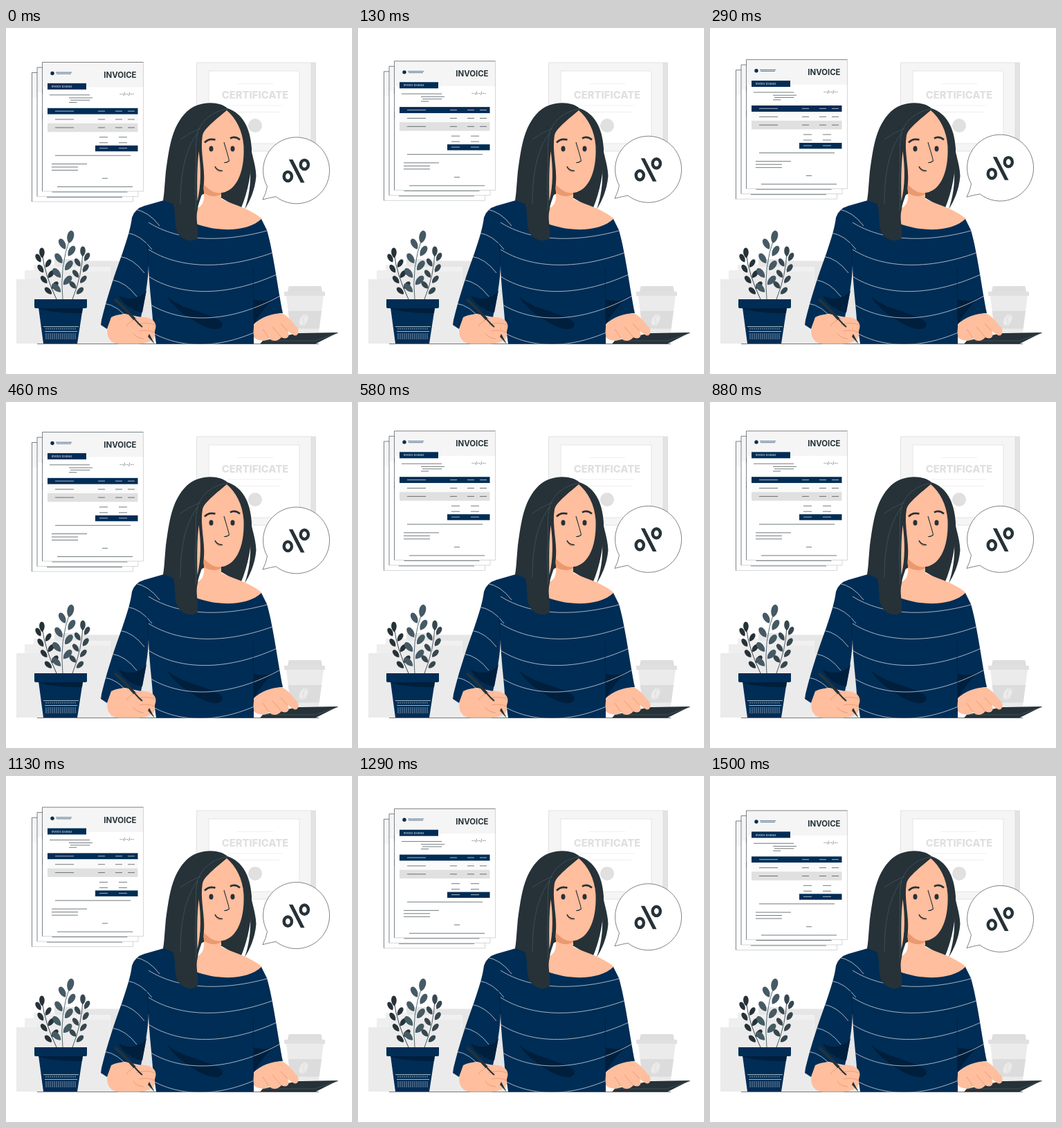
An HTML page with a canvas for the animation above (1.54 s loop, 500 px wide and 500 px high).

```html
<!DOCTYPE html>
<html lang="en">
<head>
<meta charset="utf-8">
<title>Invoice desk</title>
<style>
html, body { margin: 0; width: 100%; height: 100%; overflow: hidden; background: #fff; }
canvas { display: block; width: 500px; height: 500px; }
</style>
</head>
<body>
<canvas id="stage"></canvas>
<script>
const LOOP = 1540, FPS = 24, STEPS = 37, RISE = 10;
const NAVY = '#002d55', DEEP = '#001f3d', INK = '#263238', SLATE = '#455a64';
const SKIN = '#ffbe9d', SHADE = '#eb996e';

const canvas = document.getElementById('stage');
const ctx = canvas.getContext('2d');
const ratio = window.devicePixelRatio || 1;
canvas.width = canvas.height = 500 * ratio;

function rect(color, x, y, width, height) {
  ctx.fillStyle = color;
  ctx.fillRect(x, y, width, height);
}

function fill(color, d) {
  ctx.fillStyle = color;
  ctx.fill(new Path2D(d));
}

function stroke(color, width, d) {
  ctx.strokeStyle = color;
  ctx.lineWidth = width;
  ctx.stroke(new Path2D(d));
}

function dash(color, x, y, length) {
  stroke(color, 0.65, `M${x} ${y}h${length}`);
}

function ellipse(x, y, rx, ry = rx, angle = 0) {
  ctx.beginPath();
  ctx.ellipse(x, y, rx, ry, angle, 0, 2 * Math.PI);
}

function dot(color, ...shape) {
  ellipse(...shape);
  ctx.fillStyle = color;
  ctx.fill();
}

function label(text, x, y, font, color, align = 'left') {
  ctx.font = font + ' Inter, sans-serif';
  ctx.textAlign = align;
  ctx.fillStyle = color;
  ctx.fillText(text, x, y);
}

function certificate() {
  rect('#f5f5f5', 275.5, 50, 165.5, 128);
  rect('#e3e3e3', 441, 50, 6.5, 128);
  stroke('#dcdcdc', 0.8, 'M275.5 50h172v128h-172ZM441 50v128');
  rect('#fff', 293, 62, 131, 105);
  stroke('#e0e0e0', 0.8, 'M293 62h131v105h-131Z');
  label('CERTIFICATE', 360, 102, '800 14.8px', '#e0e0e0', 'center');
  dash('#e6e6e6', 334, 80.5, 52);
  dash('#e6e6e6', 320, 112, 80);
  dash('#e6e6e6', 325, 121.5, 70);
  dot('#e0e0e0', 360, 141, 10);
}

function folders() {
  fill('#e6e6e6', 'M70 334H101L104 336.5H214V456H70Z');
  fill('#f0f0f0', 'M40 342H70L73 345H151V456H40Z');
  fill('#efefef', 'M27 350H60L63 353H150V456H27Z');
  fill('#ebebeb', 'M15 363H46L49 352H150V456H15Z');
}

function cup() {
  fill('#ebebeb', 'M405 386H459L452 440H411Z');
  fill('#dcdcdc', 'M408 409H456L452.5 434.5H411Z');
  fill('#dedede', 'M410 373H454Q456 373 456 376L457 381H407L408 376Q408 373 410 373Z');
  rect('#e0e0e0', 402, 381, 59, 6);
  dot('#ebebeb', 430, 422, 5.5, 9, 0.5);
  stroke('#dcdcdc', 1, 'M434 414Q427 421 430 424T425 431');
}

function leaf(color, x, y, length, angle) {
  const h = length / 2, w = length * 0.4;
  ctx.save();
  ctx.translate(x, y);
  ctx.rotate(angle);
  fill(color, `M0 ${h}C${-w} ${h / 3} ${-w * 0.7} ${-h} 0 ${-h}C${w * 0.7} ${-h} ${w} ${h / 3} 0 ${h}Z`);
  ctx.restore();
}

// Leaves alternate sides down a curved stem, opening wider near its foot.
function branch(color, foot, bend, tip, length, firstSide) {
  const [a, b, c] = [foot, bend, tip];
  const at = (k, t) => (1 - t) ** 2 * a[k] + 2 * t * (1 - t) * b[k] + t * t * c[k];
  stroke(color, 0.9, `M${a}Q${b} ${c}`);
  leaf(color, ...c, length * 1.1, (c[0] - b[0]) / 70);
  for (let i = 1; i < 8; i++) {
    const t = 1 - i * 0.118, side = i % 2 ? firstSide : -firstSide;
    leaf(color, at(0, t) + side * length * 0.46, at(1, t), length, side * (0.45 + i * 0.05));
  }
}

function plant() {
  branch(INK, [73, 392], [56, 357], [52, 325], 13.5, -1);
  branch('#37474f', [96, 392], [110, 357], [111, 323], 13.5, 1);
  branch(SLATE, [82, 392], [77, 345], [93, 302], 17, -1);
}

function pot() {
  fill(NAVY, 'M47 404H111L103 456H54Z');
  fill(DEEP, 'M47 404H111L110 412Q75 413 48 406Z');
  fill(NAVY, 'M41 392H117V403Q117 405 115 405H43Q41 405 41 403Z');
  dash('#fff', 54, 431.5, 51);
  dash('#fff', 56, 438.5, 47);
  for (let x = 58; x < 102; x += 3) stroke('#fff', 0.5, `M${x} 433v3M${x} 441v9`);
}

function tableRow(color, y) {
  dash(color, 71, y, 27);
  for (const x of [133, 158, 176]) dash(color, x, y, 10);
}

function sheet(dx, dy) {
  ctx.save();
  ctx.translate(dx, dy);
  rect('#fff', 52.5, 50, 146, 186.5);
  rect('#f5f5f5', 52.5, 50, 146, 36);
  stroke('#a8adb0', 0.5, 'M198.5 50v186.5h-146');
  stroke(INK, 0.6, 'M52.5 236.5V50h146');

  dot(NAVY, 67, 66, 2.7);
  dash(NAVY, 72, 64.7, 23);
  dash(NAVY, 73, 66.7, 21);
  label('INVOICE', 188.5, 72.6, '700 11.4px', INK, 'right');
  rect(NAVY, 60, 80.4, 56, 9);
  label('Invoice #34562', 66, 86.6, '400 4px', '#fff');
  label('--/--/--', 185, 98, '400 6px', INK, 'right');
  dash(INK, 63, 97.3, 58);
  for (let i = 0; i < 3; i++) dash(INK, 91 + i % 2 * 2, 101.5 + i * 3.3, 34 - i * i * 5.7);

  rect(NAVY, 60, 116.3, 130.5, 9);
  rect('#fafafa', 60, 125.3, 130.5, 13);
  rect('#e0e0e0', 60, 138.3, 130.5, 12.5);
  for (let i = 0; i < 3; i++) tableRow(i ? INK : '#fff', 120.7 + i * 11.9);
  rect(NAVY, 129, 170.3, 61.5, 8.5);
  for (let i = 0; i < 3; i++) {
    dash(i < 2 ? INK : '#fff', 135, 158.3 + i * 8, 12);
    dash(i < 2 ? INK : '#fff', 163, 158.3 + i * 8, 12);
  }

  dash(INK, 71, 184.8, 109);
  for (let i = 0; i < 3; i++) dash(INK, 66, 197 + i * 4.5, i ? 38 : 51);
  dash(INK, 139, 217.8, 8);
  dash(INK, 74, 230, 109);
  ctx.restore();
}

function bubble() {
  const outline = 'M377.5 229.5A48 48 0 1 1 390 244.2Q380 246 371 248.5Q376 239 377.5 229.5Z';
  fill('#fff', outline);
  stroke(INK, 0.6, outline);
  ctx.strokeStyle = INK;
  ctx.lineWidth = 4.4;
  for (const side of [-1, 1]) {
    ellipse(419.3 + side * 12, 206.5 - side * 8.5, 5.6, 6.6);
    ctx.stroke();
  }
  fill(INK, 'M408.8 190.5h5.6L431.5 224h-5.6Z');
}

function head() {
  fill(INK, 'M320 116C308 105 278 105 261 121C239 143 236 173 231 207C229 228 229 238 227 249L246 265L285 240L312 246L339 262C350 237 356 205 355 174C353 143 341 123 320 116Z');
  fill(INK, 'M351 158C354 181 361 196 361.5 214C360 234 352 251 345 262C351 244 354 226 353 204Z');
  // neck and bare shoulder
  fill(SKIN, 'M283 205L311 225V247C328 255 355 262 370 276C350 303 305 303 268 288V263C284 260 287 252 286 236Z');
  fill(SHADE, 'M285 226C293 233 302 237 311 237V240C301 246 291 242 286 238Z');
  fill(SKIN, 'M319 119C332 130 342 148 343.5 171C345 212 331 238 308 238.5C296 238 285 228 280 213L280 165C280 150 300 135 319 119Z');
  // brows, eyes, nose, mouth
  stroke(INK, 2.7, 'M287 165.5Q293 159 302.5 161.5M324 159.5Q331 155.5 338 161.5');
  dot(INK, 296.5, 174.5, 3, 4);
  dot(INK, 327.5, 174.5, 3, 4);
  stroke(INK, 1.1, 'M315 165C318 176 321 184 322.5 192Q319 195 315 194.5');
  fill(SHADE, 'M302 201C306 205 310 206 313 206C309 211 304 208 302 201Z');
  stroke(INK, 1.6, 'M302 200Q304 206 313 206.5');
}

function frontHair() {
  fill(INK, 'M320 117C307 128 289 139 284 155C280 177 288 203 286 224C285 241 278 250 277 262C273 276 279 290 277 303C271 310 258 308 250 299C242 288 246 272 242 256L235 205C238 155 270 107 320 117Z');
  fill(SKIN, 'M278.5 178C282 202 282 228 276.5 250C276 225 276 200 278.5 178Z');
  stroke(SLATE, 0.7, 'M320 117C300 120 283 132 277 151C272 170 276 190 274 211C272 230 276 246 274 264M277 151C262 172 252 201 252 254M281 145Q264 152 252 161');
}

function sweater() {
  const shape = 'M228 249L200 257Q186 261 182 274C180 290 175 305 168 326C157 356 146 389 138 422L137 429L146 435Q154 414 172 413L195 418C200 395 206 365 206 340C206 365 211 403 212 421L217 456.5H358L358 428Q374 414 400 412C393 378 386 322 377 292L369 276C350 294 308 296 272 282L243 255Z';
  fill(NAVY, shape);
  fill(DEEP, 'M163 386C174 394 194 393 203 379L197 411C184 410 168 399 163 386Z');
  fill(DEEP, 'M232 386C246 403 273 406 300 418C312 422 317 429 309 434C298 439 278 428 267 420C252 411 239 400 232 386Z');
  fill(DEEP, 'M358 392Q377 399 393 386Q374 401 358 428Z');

  ctx.save();
  ctx.clip(new Path2D(shape));
  for (let i = 0; i < 5; i++) {
    const left = 281 + 39 * i, right = 286 + 33 * i;
    stroke('#fff', 0.65, `M206 ${left}C250 ${left + 28} 320 ${left + 32} 400 ${right}`);
    stroke('#fff', 0.65, `M${186 - 11 * i} ${262 + 34 * i}q20 3 36 24`);
  }
  ctx.restore();
  stroke(DEEP, 0.7, 'M203 306Q205 323 206 345M357 346L358 447');
}

function hands() {
  fill(SKIN, 'M152 418C165 411 181 414 189 418C202 416 214 420 216 428C218 434 213 439 215 445C212 453 200 456.5 190 456.5H164C150 456 144 445 147 432Z');
  stroke(SHADE, 0.9, 'M174 431Q181 421 190 420M189 429Q203 424 215 429M193 438Q205 435 214 440M184 441Q188 448 199 449');
  stroke(INK, 4, 'M157 392Q169 402 186 421');
  stroke(INK, 2, 'M186 421Q193 429 197 432');
  fill(INK, 'M207 442L215 457L205 446Z');
  fill(INK, 'M367 456.5L371 452L421 441L480 440L447 456.5Z');
  stroke(SLATE, 0.7, 'M371 452H447L480 440.5');
  fill(SKIN, 'M359 428Q372 414 398 412C408 416 414 426 421 433C425 440 421 446 416 444L407 438C412 446 405 451 398 447C392 454 384 453 380 448C376 454 365 452 359 448Q356 440 359 428Z');
  stroke(SHADE, 0.9, 'M371 435L380 448M385 432L398 447M397 427L407 438');
}

function draw(time) {
  const step = Math.min(STEPS - 1, Math.floor((time + 5) * FPS / 1000));
  const phase = (step + 1) % STEPS / STEPS;
  const lift = RISE * (1 - Math.abs(1 - 2 * phase));

  ctx.setTransform(ratio, 0, 0, ratio, 0, 0);
  rect('#fff', 0, 0, 500, 500);
  certificate();
  folders();
  cup();
  for (const i of [2, 1, 0]) sheet(-7.5 * i, 7.5 * i - lift);
  dash(INK, 45, 456.5, 407);
  plant();
  pot();
  head();
  sweater();
  frontHair();
  hands();
  ctx.translate(0, -lift);
  bubble();
}

const start = performance.now();
function tick() {
  draw((performance.now() - start) % LOOP);
  requestAnimationFrame(tick);
}
tick();
</script>
</body>
</html>
```
